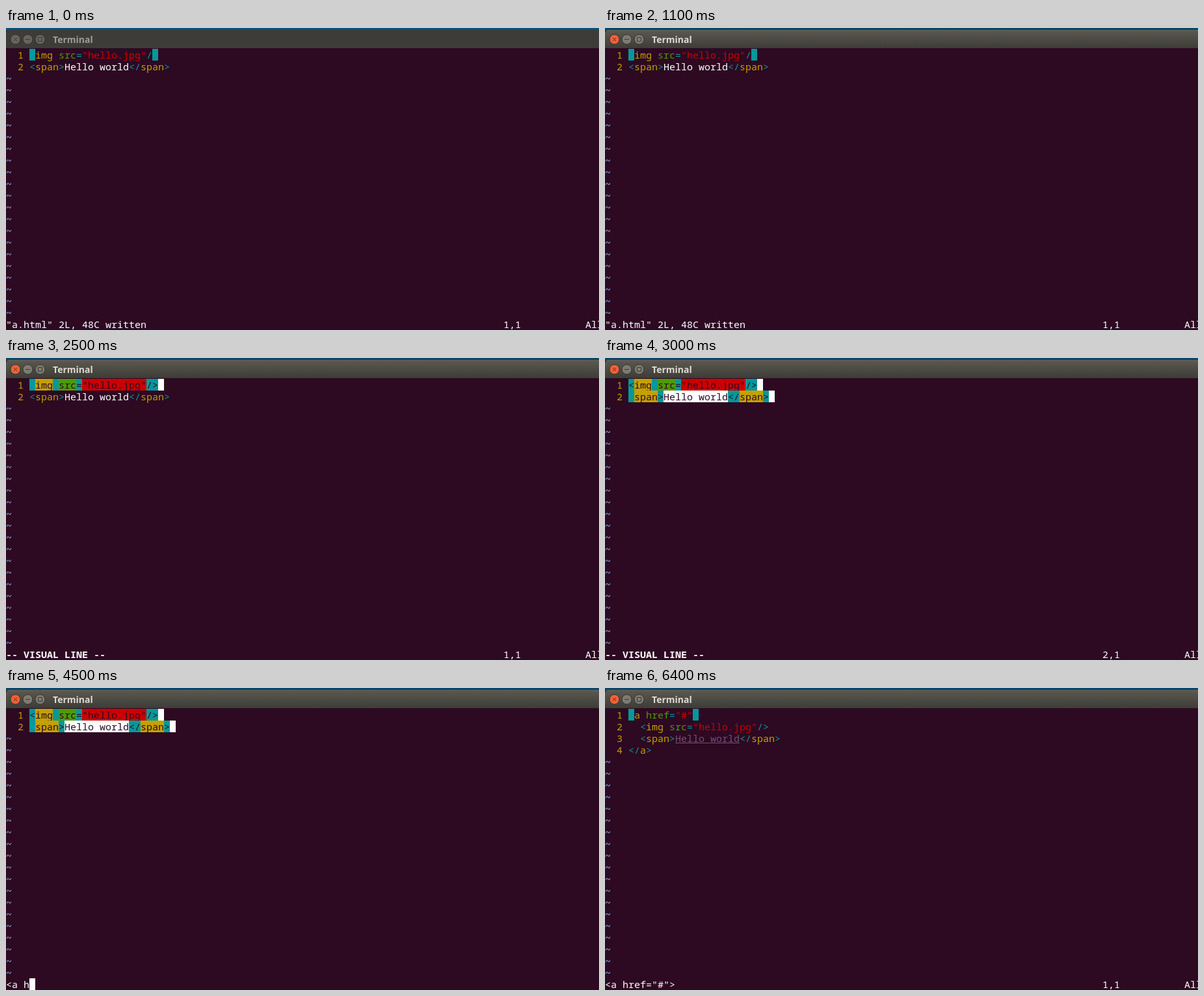
Recreate the animation shown at these times as an HTML page. Size 912 by 464 pixels, loop 6.5 s.

```html
<!DOCTYPE html>
<html lang="en">
<head>
<meta charset="utf-8">
<title>Terminal</title>
<style>
  html, body { margin: 0; width: 100%; height: 100%; overflow: hidden; background: #2d0922; }
  #stage { position: relative; width: 912px; height: 464px; overflow: hidden; background: #2d0922; }
  #desk { position: absolute; left: 0; top: 0; width: 912px; height: 4px; background: #07466b; }
  #bar { position: absolute; left: 0; top: 3px; width: 912px; height: 28px; border-radius: 5px 0 0 0;
    background: linear-gradient(#66645b 0, #59574f 2px, #3d3c37 100%); }
  #bar b { position: absolute; left: 72px; top: 0; font: bold 14px/29px "Noto Sans", sans-serif; color: #dfdbd2; }
  #bar svg { position: absolute; left: 0; top: 0; }
  #bar circle { fill: #7d7a70; stroke: #34332f; }
  #bar path { fill: none; stroke: #3b3a35; }
  #bar circle.close { fill: #ee6238; }
  #bar path.close { stroke: #6b2410; }
  .idle #desk { background: #07527f; }
  .idle #bar { background: #3d3c38; }
  .idle #bar b { color: #a09d94; }
  .idle #bar circle { fill: #66645c; }
  .idle #bar path.close { stroke: #3b3a35; }
  #screen { position: absolute; left: 0; top: 32px; font: 15px/18px "Noto Sans Mono", monospace; color: #fff; }
  .row { position: absolute; left: 0; height: 18px; white-space: pre; }
  .row span { position: absolute; top: 0; height: 18px; color: var(--c); }
  .row .sel { background: var(--c); color: #2d0922; }
  .bold { font-weight: bold; }
  .link { text-decoration: underline; }
  #pointer { position: absolute; left: 757px; top: 152px; visibility: hidden; }
</style>
</head>
<body>
<div id="stage">
  <div id="desk"></div>
  <div id="bar">
    <svg width="64" height="28">
      <circle class="close" cx="14.5" cy="14.5" r="7.5"/>
      <circle cx="33.5" cy="14.5" r="7.5"/>
      <circle cx="52.5" cy="14.5" r="7.5"/>
      <path class="close" d="M12 12l5 5m0-5l-5 5"/>
      <path d="M30 14.5h7M49.5 11.5h6v6h-6z"/>
    </svg>
    <b>Terminal</b>
  </div>
  <div id="screen"></div>
  <svg id="pointer" width="11" height="16">
    <path d="M2 1.5h2l1.500 1l1.500-1h2M5.500 2v12M2 14.500h2l1.500-1l1.500 1h2" fill="none" stroke="#111" stroke-width="3"/>
    <path d="M2 1.500h2l1.500 1l1.500-1h2M5.500 2v12M2 14.500h2l1.500-1l1.500 1h2" fill="none" stroke="#fff"/>
  </svg>
</div>
<script>
const LOOP = 6500, CELL = 9, LINE = 18, LAST_ROW = 23;
const WHITE = "#fff", CYAN = "#06989a", YELLOW = "#c4a000", GREEN = "#4e9a06",
      RED = "#cc0000", BLUE = "#729fcf", PURPLE = "#75507b";
const PROMPT = '<a href="#';

const stage = document.getElementById("stage");
const screen = document.getElementById("screen");
const pointer = document.getElementById("pointer");

// A token is [text, colour, class names].
const block = (color = CYAN) => [" ", color, "sel"];
const select = tokens => [...tokens.map(([text, color]) => [text, color, "sel"]), block(WHITE)];
const underCursor = tokens => [block(), ...tokens.slice(1)];
const matched = tokens => [...underCursor(tokens).slice(0, -1), block()];

const openTag = (name, attr, value) => [
  ["<", CYAN], [name, YELLOW], [" ", CYAN], [attr, GREEN], ["=", CYAN], [`"${value}"`, RED]
];
const image = [...openTag("img", "src", "hello.jpg"), ["/", CYAN], [">", CYAN]];
const span = (color, style) => [
  ["<", CYAN], ["span", YELLOW], [">", CYAN], ["Hello world", color, style],
  ["</", CYAN], ["span", YELLOW], [">", CYAN]
];
const plainSpan = span(WHITE);
const indent = tokens => [["  ", WHITE], ...tokens];

const buffers = {
  normal: [matched(image), plainSpan],
  oneLine: [underCursor(select(image)), plainSpan],
  twoLines: [select(image), underCursor(select(plainSpan))],
  wrapped: [
    matched([...openTag("a", "href", "#"), [">", CYAN]]),
    indent(image),
    indent(span(PURPLE, "link")),
    [["</", CYAN], ["a", YELLOW], [">", CYAN]]
  ]
};

const written = [['"a.html" 2L, 48C written', WHITE]];
const visual = [["-- VISUAL LINE --", WHITE, "bold"]];
const pending = [["-", WHITE, "sel bold"], ["- VISUAL LINE --", WHITE, "bold"]];
const typed = count => [[PROMPT.slice(0, count), WHITE], block(WHITE)];

const steps = [
  { at: 0, buffer: "normal", status: written, ruler: "1,1", idle: true },
  { at: 300, buffer: "normal", status: written, ruler: "1,1" },
  { at: 1400, buffer: "normal", status: written, ruler: "1,1", mouse: true },
  { at: 2100, buffer: "oneLine", status: visual, ruler: "1,1" },
  { at: 3000, buffer: "twoLines", status: visual, ruler: "2,1" },
  { at: 3500, buffer: "twoLines", status: pending, ruler: "2,1" },
  ...Array.from(PROMPT, (_, i) => ({ at: 3900 + i * 160, buffer: "twoLines", status: typed(i + 1) })),
  { at: 5600, buffer: "twoLines", status: [[PROMPT + '"', WHITE], block(WHITE)] },
  { at: 5900, buffer: "wrapped", status: [[PROMPT + '">', WHITE]], ruler: "1,1" }
];

function addRow(index, tokens, column = 0) {
  const row = document.createElement("div");
  row.className = "row";
  row.style.top = index * LINE + "px";
  for (const [text, color, style = ""] of tokens) {
    const run = document.createElement("span");
    run.textContent = text;
    run.className = style;
    run.style.setProperty("--c", color);
    run.style.left = column * CELL + "px";
    row.append(run);
    column += text.length;
  }
  screen.append(row);
}

function draw(step) {
  const lines = buffers[step.buffer];
  stage.classList.toggle("idle", !!step.idle);
  pointer.style.visibility = step.mouse ? "visible" : "hidden";
  screen.replaceChildren();
  for (let i = 0; i < LAST_ROW; i++) {
    addRow(i, i < lines.length ? [[`  ${i + 1} `, YELLOW], ...lines[i]] : [["~", BLUE, "bold"]]);
  }
  addRow(LAST_ROW, step.status);
  if (step.ruler) {
    addRow(LAST_ROW, [[step.ruler, WHITE]], 85);
    addRow(LAST_ROW, [["All", WHITE]], 99);
  }
}

const start = performance.now();
let shown;
function tick() {
  const time = (performance.now() - start) % LOOP;
  const step = steps.findLast(s => s.at <= time);
  if (step !== shown) draw(shown = step);
  requestAnimationFrame(tick);
}
tick();
</script>
</body>
</html>
```
